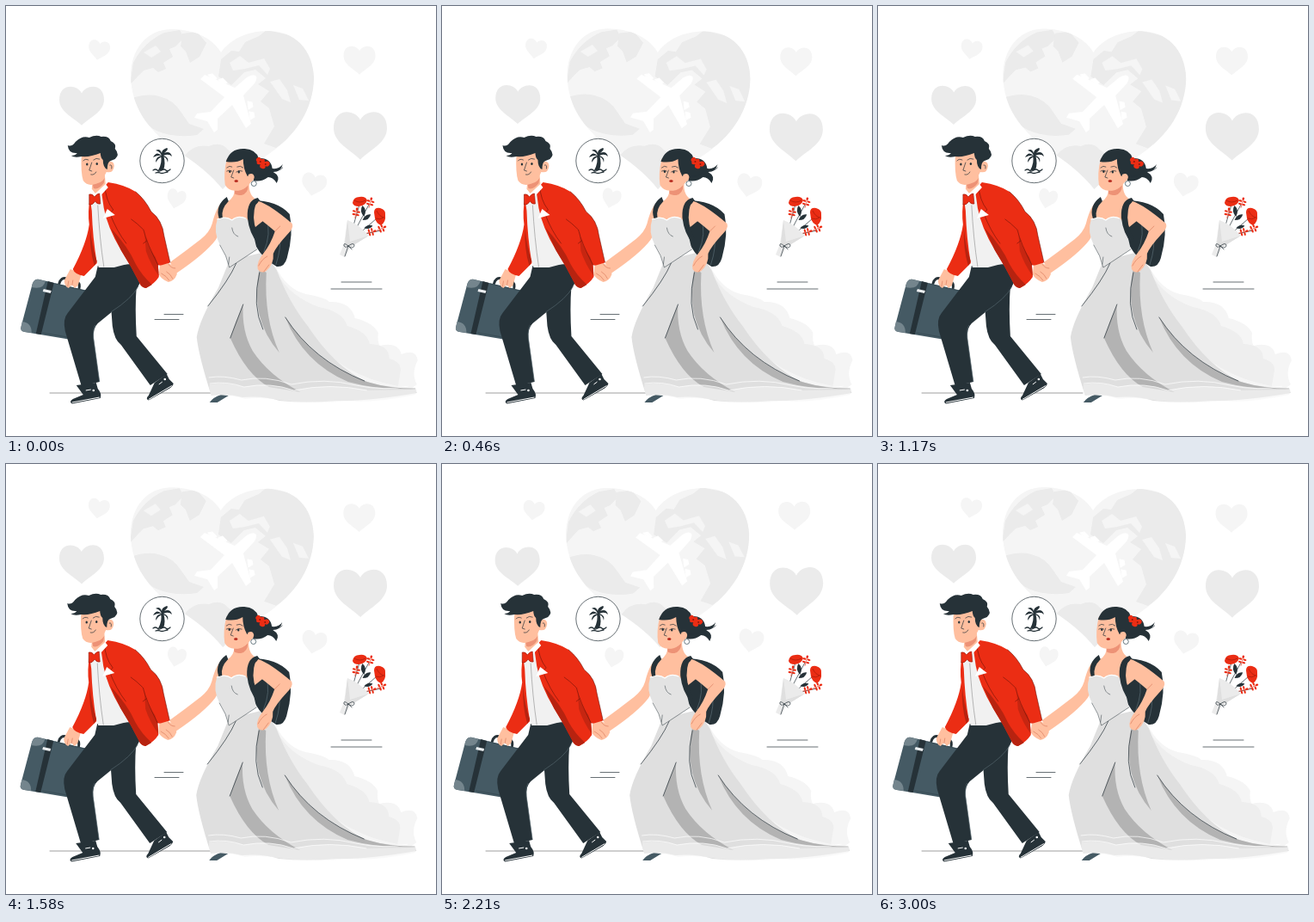
Write an HTML page that moves like this. It is 500 px wide and 500 px high and loops after 3.04 s.

```html
<!DOCTYPE html>
<html lang="en">
<head>
<meta charset="utf-8">
<title>Newlyweds on the run</title>
<style>
html, body { margin: 0; width: 100%; height: 100%; overflow: hidden; background: #fff; }
svg { display: block; width: 100vw; height: 100vh; }
.ink { fill: #263238; }
.red { fill: #eb2d14; }
.skin { fill: #ffbf9f; }
.slate { fill: #455a64; }
.pale { fill: #f5f5f5; }
.mist { fill: #ebebeb; }
.cloth { fill: #dfdfdf; }
.fold { fill: #b3b3b3; }
.white { fill: #fff; }
.line { fill: none; stroke: #263238; stroke-width: .7; stroke-linecap: round; stroke-linejoin: round; }
.seam { fill: none; stroke: #fff; stroke-width: .7; }
</style>
</head>
<body>
<svg viewBox="0 0 500 500">
<defs>
  <path id="heart" d="M0-.28C-.1-.5-.5-.53-.5-.12C-.5 .17-.18 .31 0 .5C.18 .31 .5 .17 .5-.12C.5-.53 .1-.5 0-.28z"/>
  <clipPath id="globe"><path id="world" d="M250 54C238 34 214 27 191 27C162 28 145 52 145 82C146 118 165 143 195 166Q232 188 252 213Q262 202 300 176C340 150 357 118 358 84C357 50 335 29 305 29C278 29 260 40 250 54z"/></clipPath>
  <g id="sprig" class="red">
    <ellipse cx="-2.6" cy="-2" rx="2" ry="1.1"/><ellipse cx="2.6" cy="-2" rx="2" ry="1.1"/>
    <ellipse cx="-2.2" cy="1.6" rx="2" ry="1.1"/><ellipse cx="2.2" cy="1.6" rx="2" ry="1.1"/>
    <ellipse cy="-5" rx="1.3" ry="1.8"/><path d="M0-4V6" stroke="#eb2d14" stroke-width=".6"/>
  </g>
  <path id="leaf" class="ink" d="M0 6Q-5-1 0-7Q5-1 0 6z"/>
</defs>

<g id="sky">
  <use href="#world" class="pale"/>
  <g class="mist" clip-path="url(#globe)">
    <path d="M144 92L148 66Q160 42 184 31L202 28 207 37 197 47 190 50 194 59 183 66 186 73 177 77 171 72 160 75 153 82z"/>
    <path d="M205 32L222 30 233 43 225 59 214 66 209 53 203 47z"/>
    <path d="M144 108Q164 101 178 105Q195 109 204 124L213 137 230 143 222 150Q196 154 175 145Q154 135 144 108z"/>
    <path d="M208 174Q218 160 236 163Q250 157 258 167Q280 180 268 198L252 215 210 190z"/>
    <path d="M250 62L262 52 271 53 278 42 294 35 303 28 340 36 362 65 360 110 336 150 314 165 300 160 312 140 306 119 296 111 306 99 293 91 302 84 290 74 277 77 262 92 247 82z"/>
  </g>
  <g class="pale" clip-path="url(#globe)">
    <path d="M260 66L272 58 282 66 300 61 307 73 304 80 294 69 278 73 264 75z"/>
    <path d="M307 88L318 85 327 98 331 112 321 108zM334 92L345 96 352 110 341 109zM160 54L174 46 180 53 169 60z"/>
  </g>
  <g class="white">
    <path d="M291 82Q288 78 280 83L266 95 231 80 226 85 254 106 238 123 222 125 219 130 234 134 242 147 246 144 246 131 263 115 279 142 285 137 276 104 289 90Q292 85 291 82z"/>
    <path d="M235 80l5-1 5 5-4 3zM247 86l5-2 5 5-4 3zM281 111l5 1 1 5-5 3zM283 123l5 1 1 5-5 3z" stroke="#fff" stroke-linejoin="round"/>
  </g>
  <g id="hearts"></g>
</g>

<g class="line">
  <path d="M51 450H238" stroke="#777"/>
  <path d="M184 358.500H206M173 364.500H201M390 321H425M378 329H437"/>
</g>

<g>
  <path class="white" d="M157 176Q154 179 153 181Q155 183 157 184z"/>
  <circle cx="181.500" cy="180" r="25.700" fill="#fff" stroke="#263238" stroke-width=".7"/>
  <path class="ink" d="M177 191Q182 182 180 174L183 173Q186 183 183 191z"/>
  <path class="ink" d="M181 174Q175 168 171 176Q177 173 181 174Q174 175 174 182Q177 177 181 175Q187 175 188 182Q190 176 183 174Q189 171 193 175Q191 168 184 171Q190 166 187 165Q181 167 181 171Q179 165 174 168Q179 169 181 174z"/>
  <path class="line" style="stroke-width:1.300" d="M171 191q3-2 5 0t5 0 5 0 5-1M174 194q3-1 5 0t5 0 4-1"/>
</g>

<g id="bouquet">
  <path class="line" d="M398 276L411 231M400 274L431 247M401 270L422 231M404 268L436 261"/>
  <use href="#sprig" transform="translate(407 241) rotate(12)"/>
  <use href="#sprig" transform="translate(423.500 229) rotate(15)"/>
  <use href="#sprig" transform="translate(424 263) rotate(75)"/>
  <use href="#sprig" transform="translate(436 259) rotate(65)"/>
  <use href="#leaf" transform="translate(415.500 239) rotate(-8)"/>
  <use href="#leaf" transform="translate(419 246) rotate(55) scale(.9)"/>
  <use href="#leaf" transform="translate(421 257) rotate(75) scale(.8)"/>
  <path class="red" d="M403 229Q404 222 411 222Q418 221 420 226Q418 232 410 233Q404 233 403 229zM428 240Q428 234 435 235Q442 237 441 243Q442 251 436 255Q430 252 429 247z"/>
  <path d="M405 226q6 4 13 0M431 238q3 7 9 8M430 247q5 2 9-1" fill="none" stroke="#a51c0b" stroke-width=".7"/>
  <path class="mist" d="M397 249Q409 253 422 267L401 280 394 292 388 289 393 277z"/>
  <path class="cloth" d="M397 249L400 274 422 267 401 280 394 277z"/>
  <path class="line" d="M398 279Q392 274 393 279Q395 282 398 279Q405 274 405 279Q403 283 398 279L394 291M398 279L402 283"/>
</g>

<g id="couple">
  <!-- bride -->
  <path class="slate" d="M237 461Q241 455 250 452L259 453 246 461z"/>
  <path class="pale" d="M313 302Q326 329 349 335Q372 339 376 344Q401 343 406 363Q427 368 433 380Q432 391 435 395Q456 390 460 405Q477 398 479 412Q471 427 478 440L470 446Q380 440 350 400z"/>
  <path d="M316 312Q331 338 364 350Q392 355 397 372Q421 379 423 393Q446 394 446 410Q460 414 459 424L456 442Q390 430 350 380z" fill="#eee"/>
  <path class="cloth" d="M260 296L247 328Q225 365 222 385Q224 406 239 453Q258 450 275 455Q300 453 318 459Q350 462 385 459Q420 460 478 450L476 444Q440 444 418 436Q382 419 351 372Q330 346 315 307L301 286z"/>
  <path class="fold" d="M276 347Q267 367 261 386Q280 429 306 443L343 449Q306 430 287 401Q274 378 276 347zM295 305Q283 363 318 403Q300 363 303 310zM325 362Q358 414 420 437Q446 445 478 445Q434 447 398 437Q346 415 325 362z"/>
  <path class="pale" d="M239 453Q236 446 237 440Q257 437 277 443Q308 437 335 447Q377 438 420 447L478 446 476 452Q428 462 400 459Q362 463 324 459Q299 454 278 457Q262 451 239 453z" opacity=".55"/>
  <path class="seam" d="M236 432Q253 429 274 435Q302 429 332 440Q371 432 407 441Q442 448 468 442M237 439Q257 436 277 443Q308 437 335 447Q377 438 420 447"/>
  <path class="line" d="M268 299Q260 318 235 349M276 347L261 386M295 310Q286 348 299 376M325 362Q357 412 417 436"/>

  <path class="ink" d="M286 226Q316 226 330 242Q335 265 327 293Q324 304 315 303Q299 294 290 278Q280 261 280 243z"/>
  <path d="M303 248Q309 264 300 286M318 266Q321 280 314 301" fill="none" stroke="#53656d" stroke-width=".8"/>
  <path class="skin" d="M266 211L283 206Q282 221 293 226Q301 236 299 250L284 262Q264 248 247 252Q245 236 257 228Q267 223 266 211z"/>
  <path d="M266 214Q274 217 282 208Q282 218 274 220Q268 220 266 218z" fill="#ed9276"/>
  <path class="skin" d="M254 226Q245 232 240 253Q237 263 227 271Q209 285 191 298L198 311Q232 288 244 272Q252 259 254 247z"/>
  <path class="cloth" d="M246 248Q256 244 263 249Q270 243 278 246Q284 250 286 257L292 283 260 304Q257 290 249 278Q241 262 246 248z" style="fill:#e3e3e3"/>
  <path class="line" d="M246 248Q256 244 263 249Q270 243 279 247" style="stroke:#fff;stroke-width:1.200"/>
  <path class="line" d="M249 278Q257 290 260 304L292 283M263 258Q264 266 270 268M260 292L259 300" style="stroke-width:.5"/>
  <path class="ink" d="M257 222Q243 232 248 247L252 246Q250 236 259 227z"/>
  <path class="ink" d="M293 223Q280 226 281 246Q283 264 293 276L296 271Q286 254 289 237Q290 229 296 227z"/>
  <path class="skin" d="M294 227Q307 231 333 253Q335 258 328 265Q314 280 311 288Q312 300 303 308Q297 312 293 306Q291 298 300 287Q308 277 313 262Q305 255 297 249Q287 238 294 227z"/>
  <path class="line" d="M313 262L319 256M294 302Q298 294 304 291M300 309L306 301" style="stroke:#dc8062"/>

  <path class="skin" d="M257 178Q253 194 255 208Q260 217 272 214Q281 211 284 206L290 200 286 177 271 170z"/>
  <path class="ink" d="M256 181Q261 165 278 166Q291 167 294 177Q308 176 310 189Q318 190 322 184Q320 193 311 193Q320 198 315 206Q311 199 305 199Q297 205 288 203Q289 195 284 196L281 198Q276 189 276 178Q268 183 256 181z"/>
  <path class="line" d="M306 196Q313 198 314 203M310 190Q318 193 322 188M288 198Q300 200 306 192"/>
  <path class="skin" d="M282 196Q288 193 289 199Q288 205 283 204z"/>
  <circle cx="288.500" cy="206.500" r="3" fill="none" stroke="#455a64" stroke-width=".8"/>
  <path class="red" d="M292 177q3-3 5 1q5-1 4 3q6-2 6 3q-2 4-5 2q0 4-4 3q-4-1-2-5q-5 1-4-3q-2-2 0-4z"/>
  <circle cx="296" cy="181" r="1" fill="#8f180b"/><circle cx="302" cy="184" r="1" fill="#8f180b"/>
  <g class="line"><path d="M257 188Q260 185 263 187M269 187Q273 185 276 188M265 191L262 199 265 200"/></g>
  <ellipse class="ink" cx="260.500" cy="192.500" rx="1.200" ry="1.600"/><ellipse class="ink" cx="271" cy="193" rx="1.200" ry="1.600"/>
  <ellipse cx="268" cy="203.500" rx="2.200" ry="1.600" fill="#b92f22"/>
  <path class="line" d="M257 192Q260 190 263 192M268 193Q271 190 275 192"/>

  <!-- groom -->
  <path class="line" d="M62 323Q64 315 71 317L82 320Q87 322 85 330" style="stroke-width:3"/>
  <path class="slate" d="M39 318L104 333Q108 335 107 340L101 385Q100 392 94 391L22 379Q16 378 18 372L31 323Q33 317 39 318z"/>
  <path d="M39 318L46 320Q44 330 30 327L31 323Q33 317 39 318zM19 367Q30 368 30 380L22 379Q16 378 18 372z" fill="#74858d"/>
  <path class="ink" d="M49 320L56 322 41 382 35 381z"/>
  <path d="M44 329L53 331 52 334 43 332z" fill="#eceff1"/>
  <path class="line" d="M58 323L104 334M43 380L95 389" style="stroke:#2f424b;stroke-width:.6"/>
  <path class="skin" d="M75 306L88 311Q86 318 84 325L80 328 77 324 73 328Q68 326 68 319z"/>
  <path class="line" d="M73 320L72 326M78 319L77 325" style="stroke:#dc8062"/>
  <path class="ink" d="M82 441L105 438 107 445Q112 451 110 456L77 462.500Q73 460 78 457L90 452zM173 438L187 428 190 434 195 439Q194 443 188 446L166 458.500Q162 457 166 453z"/>
  <path class="ink" d="M122 345L124 372Q126 388 134 394L168 441 188 428 152 384Q150 350 152 326z"/>
  <path class="ink" d="M107 302L148 300Q160 314 156 322Q150 336 134 347L107 369Q101 375 102 386L109 437 88 442 69 378Q66 364 72 357L104 315z"/>
  <path d="M154 326Q147 340 122 356M104 371Q101 376 102 387L109 437" fill="none" stroke="#52636b" stroke-width=".7"/>
  <path class="seam" d="M77 461L109 455M166 457.500L193 441.500M93 447L99 446M178 440L182 437" style="stroke-width:1"/>
  <g fill="#fff"><circle cx="102" cy="447" r="1.300"/><circle cx="185" cy="434" r="1.300"/></g>

  <path d="M97 221L106 212 120 208 145 299 126 304 108 304Q102 284 97 244z" fill="#f1f1f1"/>
  <path class="line" d="M107 232Q109 270 114 303" style="stroke-width:.5;stroke:#777"/>
  <path class="red" d="M98 224Q95 239 97 254Q94 276 78 306Q80 312 91 314L106 299Q101 270 100 238z"/>
  <path d="M98 258Q100 280 106 297L103 302Q97 282 98 258z" fill="#b72310"/>
  <path class="red" d="M111 214L119 205Q139 208 151 216Q162 225 169 239Q182 249 184 267L191 298Q184 304 177 301L178 315Q173 323 163 328Q157 327 155 321Q146 303 134 284Q118 257 114 235z"/>
  <path d="M122 258Q143 281 151 300Q158 313 170 324L163 328Q157 327 155 321Q146 303 134 284z" fill="#b72310"/>
  <path d="M161 258Q162 277 174 292L177 301 178 314Q168 300 163 285z" fill="#c62611"/>
  <path class="line" d="M151 216Q162 225 169 239Q182 249 184 267L191 298M177 301Q164 276 160 260Q152 252 146 248M164 273L160 276M115 208Q116 226 125 237L121 241Q129 262 140 276" style="stroke:#6f1409;stroke-width:.6"/>
  <path class="white" d="M113 247L118 236 127 243z"/>
  <path class="skin" d="M101 202L115 195 116 207Q112 214 104 218L100 213z"/>
  <path d="M101 207Q111 207 115 200L114 206Q108 214 102 212z" fill="#ed9276"/>
  <path d="M100 213L104 218 116 207 119 211 107 224 98 220z" fill="#fff"/>
  <path class="red" d="M97 219Q101 218 103 222Q106 218 109 218L110 230Q106 231 104 227Q101 232 97 231z" stroke="#8f180b" stroke-width=".6"/>

  <path class="skin" d="M88 173Q87 194 90 203Q95 210 104 207Q113 203 117 193Q125 195 126 186Q126 180 119 181L116 170 98 168z"/>
  <path class="ink" d="M88 175Q80 177 76 174Q81 174 83 171Q73 172 72 162Q77 164 81 158Q89 150 97 153Q105 149 111 152Q120 151 122 157Q129 160 127 166Q133 173 127 178L122 180Q118 181 118 190Q113 188 113 179Q110 176 110 171Q98 176 88 175z"/>
  <path class="line" d="M90 180Q92 177 96 179M102 179Q105 176 109 178M100 182L97 191 100 192M99 196Q103 197 105 193M121 185Q124 184 123 189"/>
  <ellipse class="ink" cx="94.500" cy="184" rx="1.200" ry="1.600"/><ellipse class="ink" cx="106" cy="183.500" rx="1.200" ry="1.600"/>

  <path class="skin" d="M179 302L189 299Q199 303 199 312Q196 320 189 321Q181 318 178 312z"/>
  <path class="line" d="M181 311Q187 314 190 319M187 309Q192 312 194 317M189 300Q192 305 197 305" style="stroke:#dc8062"/>
</g>
</svg>
<script>
const $ = id => document.getElementById(id);
const LOOP = 3040, LEAD = 35;

// x, y, width, height, tilt, shade
$('hearts').innerHTML = [
  [108, 51, 25, 24, 10, 'pale'], [88, 115, 52, 48, 0, 'mist'],
  [411, 62, 37, 35, 0, 'pale'], [412, 149, 62, 59, 0, 'mist'],
  [198, 224, 22, 24, 14, 'pale'], [358, 207, 29, 28, 12, 'pale']
].map(([x, y, w, h, a, c]) =>
  `<use href="#heart" class="${c}" transform="translate(${x} ${y}) rotate(${a}) scale(${w} ${h})"/>`).join('');

// Linear interpolation through evenly spaced keys; p runs from 0 to 1.
function along(keys, p) {
  const s = p * (keys.length - 1), i = Math.floor(s);
  return keys[i] + (keys[i + 1] - keys[i]) * (s - i);
}

const shake = [0, -1, 2, -4, 4, -4, 4, -4, 2, -1, 0];
const sway = [0, 1, 0, -1, 0];

function draw(now) {
  const t = now % LOOP + LEAD;
  $('couple').setAttribute('transform', `translate(${along(shake, t / 1500 % 1)} 0)`);
  $('sky').setAttribute('transform', `rotate(${along(sway, t / 3000 % 1)} 252 130)`);
  requestAnimationFrame(draw);
}
draw(0);
</script>
</body>
</html>
```
